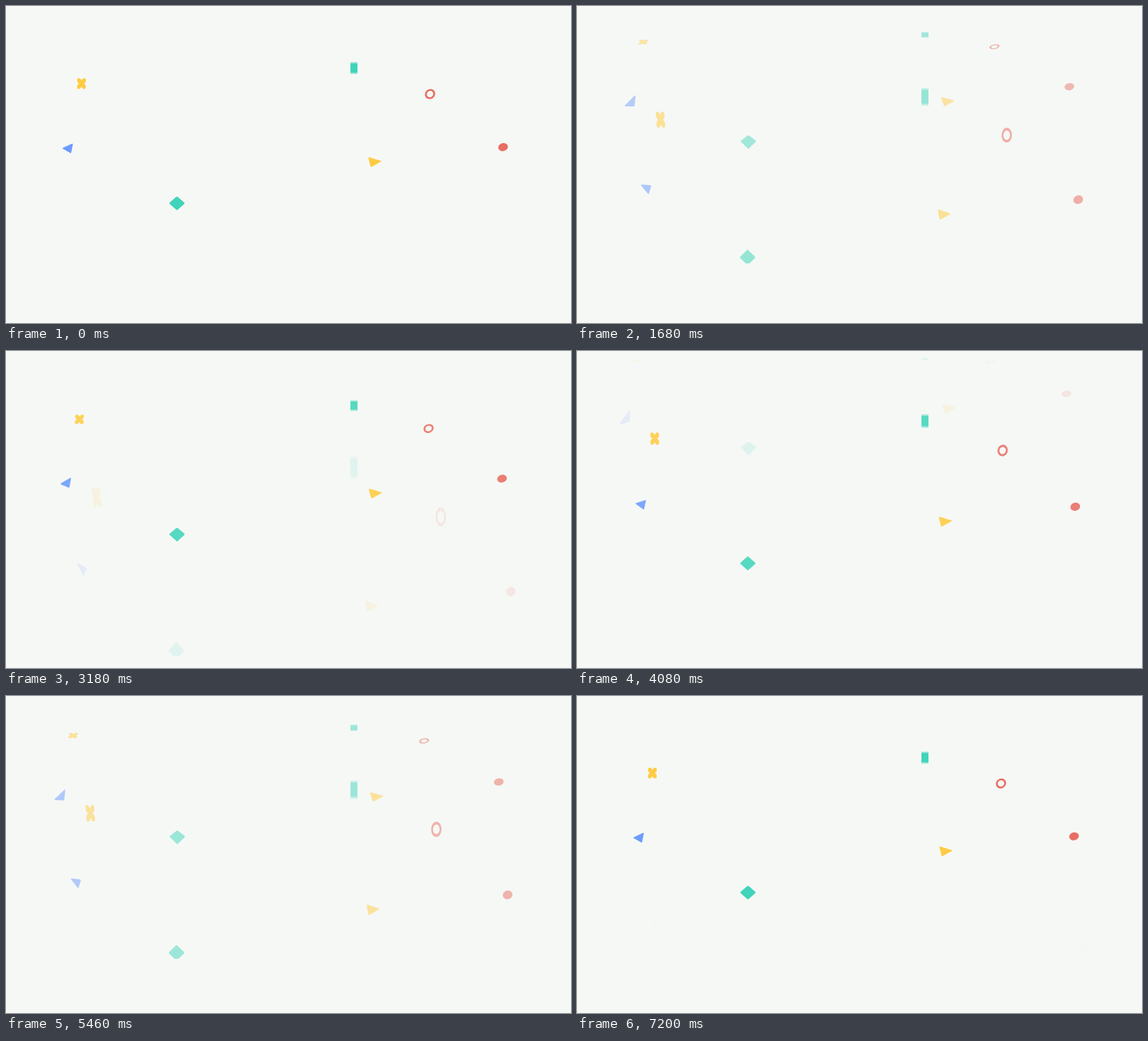
These frames come from a looping animation (738x414 px, 7.26 s). An HTML page with a canvas:

```html
<!DOCTYPE html>
<html lang="en">
<head>
<meta charset="utf-8">
<title>Falling shapes</title>
<style>
html, body { margin: 0; width: 100%; height: 100%; overflow: hidden; background: #f6f8f5; }
canvas { display: block; }
</style>
</head>
<body>
<canvas id="stage" width="738" height="414"></canvas>
<script>
const ctx = document.getElementById('stage').getContext('2d');
const LOOP = 7260, STEP = 60, LIFE = 7224;
const PAPER = '#f6f8f5', RED = '#e86d62', TEAL = '#40d4ba', YELLOW = '#ffcb42', BLUE = '#6b9bff';

// Outlines in a unit box; q runs from -0.5 to 0.5 over a life.
const circle = r => Array.from({ length: 16 }, (_, i) => {
  const a = i * Math.PI / 8;
  return [r * Math.cos(a), r * Math.sin(a)];
});
const band = (top, bottom) => [[-1, top], [1, top], [1, bottom], [-1, bottom]];
const cross = Array.from({ length: 4 }, (_, i) => {
  const a = i * Math.PI / 2, c = Math.round(Math.cos(a)), s = Math.round(Math.sin(a));
  return [[0, -.6], [.35, -1], [.85, -1], [1, -.85], [1, -.35]]
    .map(([x, y]) => [x * c - y * s, x * s + y * c]);
}).flat();
const kite = q => {
  const blunt = Math.max(0, q);
  return [[-1, q / 2], [0, -1], [1, q / 2], [blunt, 1], [-blunt, 1]];
};

// x, y, width, tilt, lean and height are [middle value, change over a life].
const still = { tilt: [0, 0], lean: [0, 0], round: .12, alpha: 1 };
const bar = { ...still, color: TEAL, round: 0, x: [454.5, 0], y: [81, 162], width: [4.6, 0], height: [7.8, 15.6] };
const shapes = [
  { ...still, color: YELLOW, outlines: () => [cross],
    x: [98.6, 45], y: [101.3, 203], width: [5.6, 0], lean: [-.1, 3.6], height: [6.9, 14.5] },
  { ...bar, outlines: () => [band(-.8, .8)] },
  { ...bar, outlines: () => [band(-1, -.8), band(.8, 1)], alpha: .5 },
  { ...still, color: RED, round: .5, outlines: () => [circle(1), circle(.63)],
    x: [553.9, 32], y: [115, 231], width: [6.8, .5], tilt: [-.6, 1.6], height: [6.7, 13.4] },
  { ...still, color: RED, round: .5, outlines: () => [circle(1)],
    x: [649.3, 23], y: [184.3, 295], width: [6.4, 0], tilt: [-.5, 0], height: [5.3, 1.9] },
  { ...still, color: BLUE, outlines: () => [[[-1, 0], [1, -1], [1, 1]]],
    x: [79.6, 41], y: [185.8, 219], width: [6.7, -2], tilt: [.1, 14.5], lean: [-1.3, -2.2], height: [6.8, -3.5] },
  { ...still, color: YELLOW, outlines: () => [[[-1, -1], [1, 0], [-1, 1]]],
    x: [482.9, -10], y: [203.2, 295], width: [8.2, 0], tilt: [-.6, 0], lean: [1.7, -1.7], height: [6.8, 1.5] },
  { ...still, color: TEAL, outlines: q => [kite(q)],
    x: [223.3, -2], y: [257.6, 299], width: [10.6, 0], height: [9.2, 0] }
];

const between = ([ax, ay], [bx, by], k) => [ax + (bx - ax) * k, ay + (by - ay) * k];

function trace(pts, round) {
  pts.forEach((p, i) => {
    const prev = pts.at(i - 1), next = pts[(i + 1) % pts.length];
    const start = between(p, prev, round), end = between(p, next, round);
    i ? ctx.lineTo(...start) : ctx.moveTo(...start);
    ctx.quadraticCurveTo(...p, ...end);
  });
  ctx.closePath();
}

function drawShapes(phase) {
  const q = phase - .5;
  const at = ([middle, change]) => middle + change * q;
  for (const s of shapes) {
    const place = ([x, y]) => [
      at(s.x) + x * at(s.width) + y * at(s.lean),
      at(s.y) + x * at(s.tilt) + y * at(s.height)
    ];
    ctx.globalAlpha = (1 - 2 * Math.abs(q)) * s.alpha;
    ctx.fillStyle = s.color;
    ctx.beginPath();
    for (const pts of s.outlines(q)) trace(pts.map(place), s.round);
    ctx.fill('evenodd');
  }
}

let began;
function frame(now) {
  began ??= now;
  const t = Math.floor((now - began) % LOOP / STEP) * STEP;
  ctx.globalAlpha = 1;
  ctx.fillStyle = PAPER;
  ctx.fillRect(0, 0, 738, 414);
  for (const offset of [0, .5]) drawShapes((t / LIFE + offset) % 1);
  requestAnimationFrame(frame);
}
requestAnimationFrame(frame);
</script>
</body>
</html>
```
